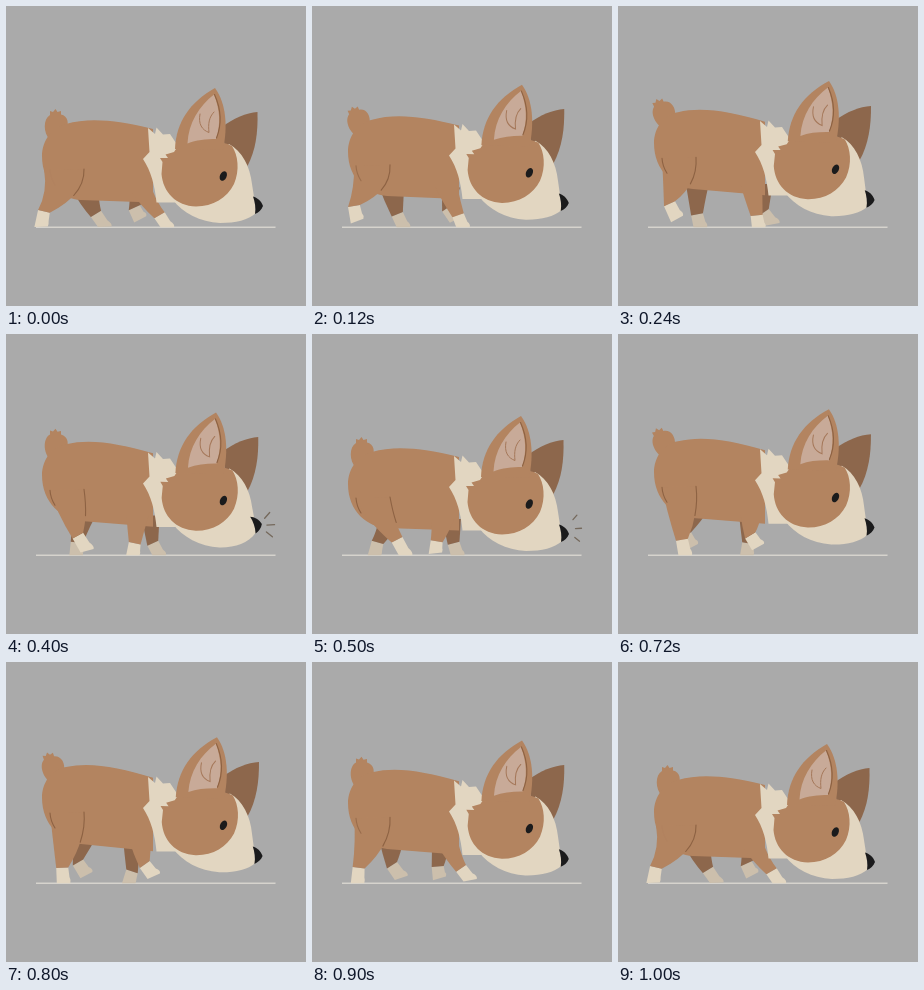
An HTML page for the animation above (1020 ms loop, 300 px wide and 300 px high).

```html
<!DOCTYPE html>
<html lang="en">
<head>
<meta charset="utf-8">
<title>Sniffing corgi</title>
<style>
  html, body { margin: 0; width: 100%; height: 100%; overflow: hidden; background: #aaa; }
  svg { display: block; width: 100vw; height: 100vh; }
  .coat { fill: #b38460; }
  .shade { fill: #8d674c; }
  .cream { fill: #e2d6c1; }
  .dim { fill: #ccbfac; }
  .ink { fill: #1b1b1c; }
  .crease { fill: none; stroke: #8d6243; stroke-width: 1.1; stroke-linecap: round; }
  .fold { fill: none; stroke: #a5785a; stroke-width: 1; stroke-linecap: round; }
  .whiff { fill: none; stroke: #75695c; stroke-width: 1.3; stroke-linecap: round; }
</style>
</head>
<body>
<svg viewBox="0 0 300 300">
  <path d="M30 221.3H269.500" stroke="#d6d3cd" stroke-width="1.5"/>
  <g id="farLegs"></g>
  <g id="body">
    <path id="tail" class="coat" d="M44 134C37 127 37 113 44 109L44 105L47 106L49.500 103L51.500 106L55 105L55 108.500C62 110 64 118 59 126Z"/>
    <path class="coat" d="M60 118C84 111 112 114.500 147 123V196.500L75 194C56 193 36 178 36 150C36 136 45 121 60 118Z"/>
  </g>
  <g id="nearLegs"></g>
  <path id="haunch" class="crease"/>
  <path id="rump" class="crease"/>
  <g id="head">
    <path class="cream" d="M142 122L149 128L150.500 121.500L157 128.500L164 128L172 140L176 196.500H150.500C149 180 145 165 137 153L143.500 146Z"/>
    <g id="skull">
      <path class="shade" d="M216 121C228 112 240 107 251.500 106C252 126 250 144 241 161L220 150Z"/>
      <path id="muzzle" class="cream"/>
      <path class="coat" d="M172 140C190 133 214 134 226 140C232 149 234 164 228 178C221 192 207 200.500 190 200.500C170 200 157 186 155.500 168L156.500 156L154 152L162 152L159.500 148.500L168 146Z"/>
      <path class="coat" d="M169 143C170 116 184 96 209 82C220 97 222 120 217 144Z"/>
      <path fill="#c8aa98" d="M181.500 137.500C182.500 117 193 100 208 88.500C214 104 215 118 210 133C200 133 190 134 181.500 137.500Z"/>
      <path class="crease" d="M208.500 88.500C215.500 104 216 118 210.500 132"/>
      <path class="fold" d="M194 108C192 118 196 124 203 126.500C202 118 203 111 208 106"/>
      <ellipse class="ink" cx="217.300" cy="170" rx="3.300" ry="5" transform="rotate(25 217.300 170)"/>
      <path id="nose" class="ink" d="M247 190.500C251 191.500 255.500 195 257 200C255.500 204 252.500 206.500 249 208C250 202 249 196 247 190.500Z"/>
    </g>
    <path id="whiff" class="whiff"/>
  </g>
</svg>
<script>
const $ = id => document.getElementById(id);
const set = (id, name, value) => $(id).setAttribute(name, value);
const mix = (a, b, k) => a + (b - a) * k;
const clamp = x => Math.min(1, Math.max(0, x));
const arc = u => Math.sin(Math.PI * clamp(u));

// One rise and fall per half stride; a larger lag peaks later.
const lift = (p, lag) => arc(p ** lag) ** 1.5;

// Smooth bump of 200 ms around a moment.
const bump = (t, centre) => arc((t - centre + 100) / 200) ** 2;

// touch: share of the stride at landing; reach and trail: ends of the step.
const legs = {
  farHind: { touch: .01, reach: 99, trail: 61, height: 13, hip: [67, 92], follow: 0 },
  farFront: { touch: .3, reach: 160, trail: 122, height: 12, hip: [122, 140], follow: .6 },
  nearFront: { touch: .96, reach: 164, trail: 121, height: 12, hip: [121, 143], follow: .12 },
  nearHind: { touch: .49, reach: 94, trail: 34, height: 15.5 }
};

for (const name in legs) {
  const far = name.startsWith('far'), leg = legs[name];
  const add = cls => {
    const p = document.createElementNS('http://www.w3.org/2000/svg', 'path');
    p.setAttribute('class', cls);
    return $(far ? 'farLegs' : 'nearLegs').appendChild(p);
  };
  leg.paw = add(far ? 'dim' : 'cream');
  leg.limb = add(far ? 'shade' : 'coat');
}

// The paw slides back on the ground for half a stride, then swings forward.
function step(leg, stride) {
  const p = (stride - leg.touch + 1) % 1;
  const stance = clamp(p * 2), swing = clamp(p * 2 - 1), air = arc(swing);
  const ahead = 1 - stance + swing ** 1.3;
  const x = mix(leg.trail, leg.reach, ahead), y = 221.3 - 8 * air;
  const lean = mix(-4, 8, ahead) + 6 * air;

  const tilt = Math.atan2(lean, leg.height), c = 6 * Math.cos(tilt), s = 6 * Math.sin(tilt);
  const ax = x - lean, ay = y - leg.height;
  const rear = [ax - c, ay + s], front = [ax + c, ay - s];

  const roll = .5 * air;
  const sole = d => [x + d * Math.cos(roll), y - d * Math.sin(roll)];
  const toe = sole(7.5);
  leg.paw.setAttribute('d',
    `M${rear}L${front}L${mix(front[0], toe[0], .6)} ${mix(front[1], toe[1], .6)}
     Q${toe[0] + 1} ${toe[1] - 3} ${toe}L${sole(-6)}Z`);
  return { x, rear, front };
}

function drawLimb(leg, foot, rearHip, rearBend, frontBend, frontHip) {
  leg.limb.setAttribute('d',
    `M${rearHip}Q${rearBend} ${foot.rear}L${foot.front}Q${frontBend} ${frontHip}Z`);
}

function straightLeg(leg, stride, dy) {
  const foot = step(leg, stride), shift = (foot.x - 130) * leg.follow;
  const [a, b] = leg.hip.map(x => x + shift), top = 185 + dy, bend = 199 + dy;
  drawLimb(leg, foot, [a, top], [mix(a, foot.rear[0], .4), bend],
    [mix(b, foot.front[0], .5), bend], [b, top]);
}

function thighLeg(leg, stride, dy) {
  const foot = step(leg, stride);
  const forward = clamp((foot.x - leg.trail) / 16);
  const hip = [78, 163 + dy];
  const bend = [mix(82, foot.front[0], .08), 189 + dy];
  drawLimb(leg, foot, [mix(38, 44, forward), 164 + dy],
    [mix(45, foot.rear[0], .25), 186 + dy], bend, hip);

  // The upper part of the front edge shows as a crease on the coat.
  const part = (a, b) => a.map((v, i) => mix(v, b[i], .56));
  const mid = part(hip, bend), end = part(mid, part(bend, foot.front));
  set('haunch', 'd', `M${hip}Q${mid} ${end}`);
  set('rump', 'd', `M44 ${164 + dy}Q44.500 ${172 + dy} 49 ${179 + dy}`);
  set('rump', 'opacity', forward);
}

// Three rays fly out from the nose and shrink to dots.
function drawWhiff(t) {
  const age = (t - 330) / 340;
  const half = age > 0 && age < 1 ? 4 * (1 - age * age) * clamp(age * 5) : 0;
  const rays = [-49, -3, 39].map((deg, i) => {
    const a = deg * Math.PI / 180, dx = Math.cos(a), dy = Math.sin(a);
    const x = 256 + 6 * dx + 6 * age + (i ? 1.5 : 0), y = 185 + 9.5 * i + 7 * dy * (age - .2);
    return `M${x - dx * half} ${y - dy * half}L${x + dx * half} ${y + dy * half}`;
  });
  set('whiff', 'd', half ? rays.join('') : '');
}

function draw(t) {
  const stride = t / 1000 % 1, p = stride * 2 % 1;
  const headY = -7.2 * lift(p, 1.1), rearY = -13 * lift(p, 1.3);
  const sniff = bump(t, 400) + bump(t, 640);

  // Shear the trunk so that rump and chest rise by their own amounts.
  const k = (headY - rearY) / 90;
  set('body', 'transform', `matrix(1 ${k} 0 1 0 ${rearY - 60 * k})`);
  set('tail', 'transform', `rotate(${-28 * arc(p / .8)} 50 128)`);

  straightLeg(legs.farHind, stride, rearY);
  straightLeg(legs.farFront, stride, headY);
  straightLeg(legs.nearFront, stride, headY);
  thighLeg(legs.nearHind, stride, rearY);

  set('head', 'transform', `translate(0 ${headY})`);
  set('skull', 'transform', `rotate(${1.2 * lift(p, 1.1)} 205 180)`);
  set('nose', 'transform', `translate(${-sniff} ${-5 * sniff}) rotate(${-12 * sniff} 248 199)`);
  set('muzzle', 'd', `M223 138C236 145 244 160 246 ${178 - 2 * sniff}
    L248 ${191 - 5 * sniff}L250 ${207 - 5 * sniff}C242 ${214 - sniff} 230 217 214 217
    C194 216 177 207 167 194L200 160Z`);
  drawWhiff(t);
}

const start = performance.now();
function tick() {
  const t = (performance.now() - start) % 1020;
  draw(Math.floor(t / 20) * 20);
  requestAnimationFrame(tick);
}
tick();
</script>
</body>
</html>
```
